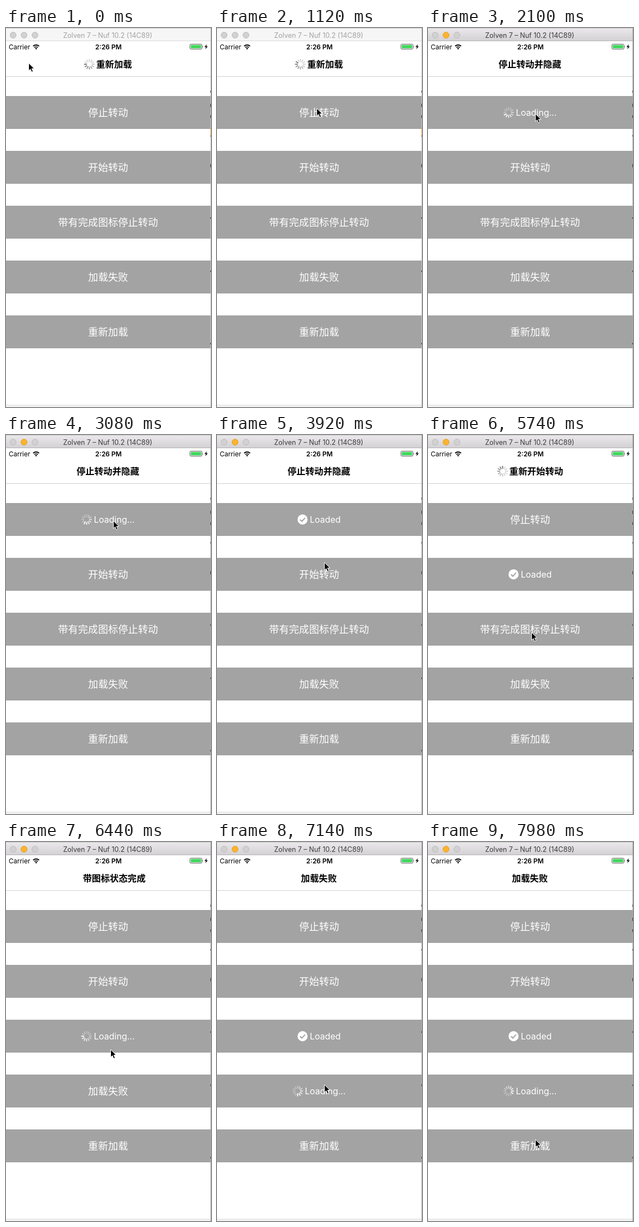
Animation, 375 px wide and 691 px high, one loop 8000 ms. Source, as an HTML page:

```html
<!DOCTYPE html>
<html lang="zh-CN">
<head>
<meta charset="utf-8">
<title>加载按钮</title>
<style>
html, body { margin: 0; width: 100%; height: 100%; overflow: hidden; background: #fff; }
svg { display: block; width: 375px; height: 691px; }
text { font-family: Inter, "Noto Sans CJK SC", "Noto Sans CJK", sans-serif; }
.mid { text-anchor: middle; }
.nav { font-size: 16.4px; font-weight: 600; }
.label { font-size: 18.3px; fill: #fff; }
.state { font-size: 16px; fill: #fff; }
</style>
</head>
<body>
<svg viewBox="0 0 375 691" xmlns="http://www.w3.org/2000/svg">
  <defs>
    <linearGradient id="chrome" x2="0" y2="1">
      <stop offset="0" stop-color="#ebe9eb"/>
      <stop offset="1" stop-color="#d2d0d2"/>
    </linearGradient>
  </defs>
  <rect width="375" height="691" fill="#fff"/>

  <g id="titleBar">
    <rect id="bar" width="374" height="24"/>
    <rect width="375" height="1" fill="#c9c9c9"/>
    <rect id="barLine" y="23" width="374" height="1"/>
    <g id="lights" stroke-width="1">
      <circle cx="13" cy="13" r="5.5" fill="#d2d1d2" stroke="#bdbcbd"/>
      <circle id="amber" cx="33" cy="13" r="5.5"/>
      <circle cx="53" cy="13" r="5.5" fill="#d2d1d2" stroke="#bdbcbd"/>
    </g>
    <text id="caption" class="mid" x="186" y="18" font-size="12.5">Zolven 7 – Nuf 10.2 (14C89)</text>
  </g>

  <g id="status">
    <text x="5" y="38.5" font-size="12">Carrier</text>
    <g fill="none" stroke="#000" stroke-width="1.8">
      <path d="M49.6 33.2a8 8 0 0 1 11 0"/>
      <path d="M51.8 35.6a4.9 4.9 0 0 1 6.6 0"/>
    </g>
    <path d="M53.2 37.2a2.7 2.7 0 0 1 3.8 0L55.1 39.2z"/>
    <text class="mid" x="187.5" y="38.5" font-size="12" font-weight="600">2:26 PM</text>
    <rect x="336.5" y="29.5" width="22" height="9" rx="1.8" fill="#fff" stroke="#555" stroke-width="1"/>
    <rect x="338" y="31" width="19" height="6" rx=".5" fill="#3fd75c"/>
    <path d="M359.6 32.4q1.6 1.6 0 3.4z" fill="#444"/>
    <path d="M367.6 29.6l-4.6 5h2.8l-1.4 4.2 4.8-5.3h-2.9z"/>
  </g>
  <rect y="88" width="374" height="1" fill="#cfcfcf"/>

  <text id="heading" class="mid nav" y="72.2"></text>
  <g id="navSpin"></g>
  <g id="buttons"></g>

  <g id="edges">
    <path d="M0 687.5H374" stroke="#dcdcdc"/>
    <rect y="688" width="374" height="3" fill="#f3f3f3"/>
    <rect id="side" x="374" width="1" height="691"/>
    <path d="M374.5 114v4M374.5 138v6M374.5 159v5M374.5 195v3M374.5 248v6M374.5 345v3M374.5 442v3M374.5 574v3" stroke="#333"/>
    <path id="fleck" d="M374.5 182v14" stroke="#e9a23b"/>
  </g>

  <path id="cursor" d="M.5 .5V14.4L3.7 11.4 6 16.8 8.5 15.7 6.2 10.5H10.6z" fill="#000" stroke="#fff" stroke-width="1" stroke-linejoin="round"/>
</svg>
<script>
const LOOP = 8000, STEP = 140, LOAD = 1000, HOLD = 1000, ACTIVATE = 1400;
const $ = id => document.getElementById(id);

function make(parent, tag, attrs, text) {
  const el = document.createElementNS('http://www.w3.org/2000/svg', tag);
  set(el, attrs);
  if (text) el.textContent = text;
  return parent.appendChild(el);
}
function set(el, attrs) {
  for (const k in attrs) el.setAttribute(k, attrs[k]);
}
function show(el, on) {
  el.style.display = on ? '' : 'none';
}

function addSpokes(g, color) {
  for (let i = 0; i < 12; i++) {
    make(g, 'path', { d: 'M0 -5.3V-9', stroke: color, 'stroke-width': 1.9,
      'stroke-linecap': 'round', transform: `rotate(${i * 30})` });
  }
}

// One turn per second in twelve jumps, with a fading tail.
function turn(g, t, offset) {
  const head = Math.floor(t * 0.012 + offset) % 12;
  [...g.children].forEach((spoke, i) => {
    const behind = (head - i + 12) % 12;
    spoke.setAttribute('opacity', Math.max(0.3, 1 - behind * 0.1));
  });
}

const buttons = [
  { label: '停止转动', click: 2090, phase: 7 },
  { label: '开始转动', click: 4400, phase: 7 },
  { label: '带有完成图标停止转动', click: 6100, phase: 4 },
  { label: '加载失败', click: 7060, phase: 5 },
  { label: '重新加载', click: Infinity, phase: 0 }
];

buttons.forEach((b, i) => {
  const g = make($('buttons'), 'g', { transform: `translate(0 ${124 + i * 100})` });
  make(g, 'rect', { width: 374, height: 60, fill: '#a3a3a3' });
  b.idle = make(g, 'text', { class: 'mid label', x: 186.7, y: 37 }, b.label);
  b.loading = make(g, 'g', {});
  b.spin = make(b.loading, 'g', { transform: 'translate(147.5 30)' });
  addSpokes(b.spin, '#fff');
  make(b.loading, 'text', { class: 'mid state', x: 198, y: 36 }, 'Loading...');
  b.loaded = make(g, 'g', {});
  make(b.loaded, 'circle', { cx: 156.5, cy: 30, r: 9.2, fill: '#fff' });
  make(b.loaded, 'path', { d: 'M152 30.2l3.2 3.3 6-6.4', fill: 'none',
    stroke: '#a3a3a3', 'stroke-width': 2 });
  make(b.loaded, 'text', { class: 'mid state', x: 198, y: 36 }, 'Loaded');
});
addSpokes($('navSpin'), '#777');

// start, text, text centre, spinner centre (0 = hidden), spinner phase
const headings = [
  [0, '重新加载', 197.7, 152.5, 9],
  [2090, '停止转动并隐藏', 186.3, 0, 0],
  [4400, '重新开始转动', 198, 136.5, 3.2],
  [6100, '带图标状态完成', 198, 0, 0],
  [7060, '加载失败', 186.3, 0, 0]
];

// time, x, y of the pointer tip
const path = [
  [0, 41, 63.5], [1120, 182, 146], [1260, 184, 147], [1680, 196, 156],
  [3640, 196, 156], [3780, 196, 176], [3920, 196, 232], [4060, 198, 249],
  [4200, 199, 254], [4760, 199, 254], [5460, 190, 350], [5740, 189, 359.5],
  [6020, 189, 360], [6440, 191, 378], [6580, 194, 431], [6860, 196, 440],
  [7560, 196, 446], [7700, 196, 465], [7840, 196, 500], [7980, 196, 542]
];

function pointer(t) {
  const i = path.findIndex(p => p[0] >= t);
  if (i <= 0) return path[i < 0 ? path.length - 1 : 0].slice(1);
  const a = path[i - 1], b = path[i];
  const u = (t - a[0]) / (b[0] - a[0]), e = u * u * (3 - 2 * u);
  return [a[1] + (b[1] - a[1]) * e, a[2] + (b[2] - a[2]) * e];
}

function drawWindow(active) {
  set($('bar'), { fill: active ? 'url(#chrome)' : '#f6f6f6' });
  set($('barLine'), { fill: active ? '#b4b2b4' : '#d8d8d8' });
  set($('amber'), active ? { fill: '#fdb32f', stroke: '#dfa023' }
                         : { fill: '#d2d1d2', stroke: '#bdbcbd' });
  set($('caption'), { fill: active ? '#3c3c3c' : '#a2a2a2' });
  set($('side'), { fill: active ? '#a9a9a9' : '#c6c6c6' });
  show($('fleck'), !active);
}

function draw(t) {
  drawWindow(t >= ACTIVATE);

  const [, text, x, spinX, phase] = headings.filter(h => h[0] <= t).pop();
  $('heading').textContent = text;
  set($('heading'), { x });
  show($('navSpin'), spinX);
  set($('navSpin'), { transform: `translate(${spinX} 66)` });
  turn($('navSpin'), t, phase);

  for (const b of buttons) {
    const age = t - b.click;
    const busy = age >= 0 && age < LOAD;
    const done = age >= LOAD && age < LOAD + HOLD;
    show(b.idle, !busy && !done);
    show(b.loading, busy);
    show(b.loaded, done);
    turn(b.spin, t, b.phase);
  }

  set($('cursor'), { transform: `translate(${pointer(t).join(' ')})` });
}

// The screen is sampled in steps, like a screen recorder would.
function tick(now) {
  draw(Math.floor((now % LOOP) / STEP) * STEP);
  requestAnimationFrame(tick);
}
draw(0);
requestAnimationFrame(tick);
</script>
</body>
</html>
```
